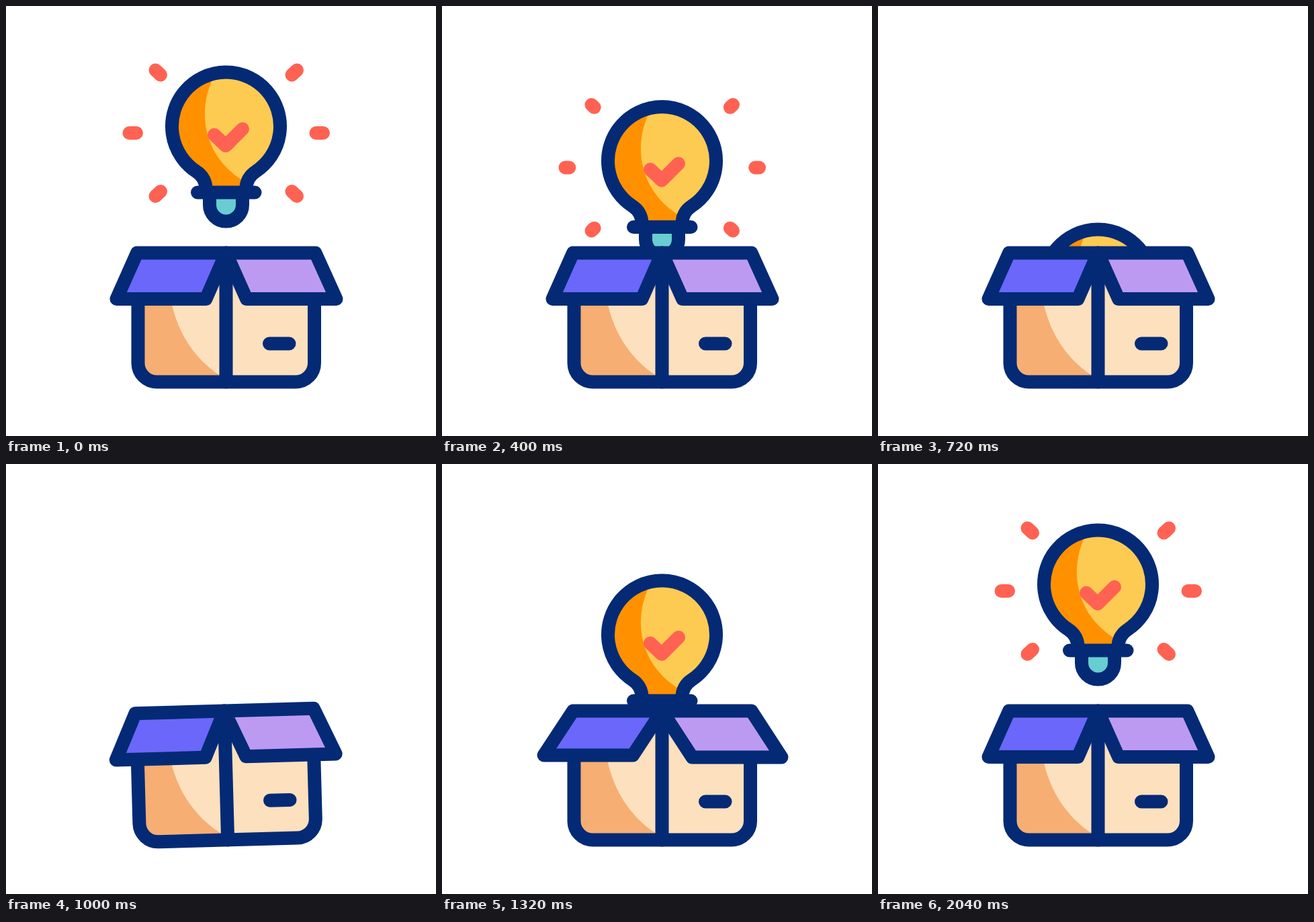
These frames come from a looping animation (640x640 px, 2160 ms). An HTML page:

```html
<!DOCTYPE html>
<html lang="en">
<head>
<meta charset="utf-8">
<title>Idea box</title>
<style>
  html, body { margin: 0; width: 100%; height: 100%; overflow: hidden; background: #fff; }
  svg { display: block; width: 100vw; height: 100vh; }
  .ink { stroke: #042a75; }
  .red { stroke: #ff6252; }
  .line { fill: none; }
  g { stroke-width: 20; stroke-linecap: round; stroke-linejoin: round; }
</style>
</head>
<body>
<svg viewBox="0 0 640 640">
  <defs>
    <path id="glass" d="M297.5 272C297.5 261 292 252 283.5 246.5A80.5 80.5 0 1 1 371.5 246.5C363 252 357.5 261 357.5 272"/>
    <path id="crate" d="M196.5 420V531.5A28 28 0 0 0 224.5 559.5H431A28 28 0 0 0 459 531.5V420"/>
    <clipPath id="glassClip"><use href="#glass"/></clipPath>
    <clipPath id="crateClip"><use href="#crate"/></clipPath>
    <clipPath id="aboveFloor"><rect width="640" height="500"/></clipPath>
  </defs>

  <g clip-path="url(#aboveFloor)">
    <g id="bulb">
      <g id="rays" class="red"></g>
      <path class="ink" fill="#68cdd1" d="M303 278V296A24.5 24.5 0 0 0 352 296V278"/>
      <use href="#glass" fill="#fecb52"/>
      <path clip-path="url(#glassClip)" fill="#ff9100" d="M312 100C284 150 289 222 356 262V280H230V90H312Z"/>
      <use href="#glass" class="ink line"/>
      <path class="ink" d="M285 277.5H370.5"/>
      <path id="tick" class="red line"/>
    </g>
  </g>

  <g id="box">
    <rect x="196.5" y="367.5" width="262.5" height="60" fill="#fde0bd"/>
    <use href="#crate" fill="#fde0bd"/>
    <path clip-path="url(#crateClip)" fill="#f6ae73" d="M190 400H240L246 440C256 490 285 530 322 552V570H190Z"/>
    <use href="#crate" class="ink line"/>
    <path class="ink" d="M327.5 367.5V559.5M392 502.5H421.5"/>
    <path id="flapL" class="ink" fill="#6a67fa"/>
    <path id="flapR" class="ink" fill="#bc9af2"/>
  </g>
</svg>

<script>
const LOOP = 2160, STEP = 40, SINK = 300;
const $ = id => document.getElementById(id);
const mix = (a, b, k) => a + (b - a) * k;
const span = (t, a, b) => Math.min(1, Math.max(0, (t - a) / (b - a)));
const smooth = x => x * x * (3 - 2 * x);

// Eased value from a list of [time, value] stops
function track(t, stops) {
  let value = stops[0][1];
  for (let i = 1; i < stops.length; i++) {
    const [a, from] = stops[i - 1], [b, to] = stops[i];
    if (t >= a) value = mix(from, to, smooth(span(t, a, b)));
  }
  return value;
}

const TILT = [[740, 0], [820, -3.2], [900, 3.2], [1000, -1.58], [1080, 0]];
const FLAP = [[1040, 0], [1240, 1.08], [1700, 0]];
const TICK = [[1380, 1], [1620, 1.48], [1860, 1]];

// Each ray: outer x, outer y, inner x, inner y
const rays = [
  [222.5, 95.5, 230, 102.5], [433, 95.5, 425.5, 102.5],
  [183.5, 189, 194, 189], [472, 189, 461.5, 189],
  [222.5, 283, 230, 276], [433, 283, 425.5, 276]
].map(ends => {
  const el = document.createElementNS("http://www.w3.org/2000/svg", "path");
  $("rays").append(el);
  return { el, ends };
});

function drawRays(t) {
  // Shrink towards the outer end, later grow from the inner end
  const tail = t < 1000 ? smooth(span(t, 190, 640)) : 0;
  const head = t < 1000 ? 1 : smooth(span(t, 1380, 1850));
  for (const { el, ends: [ox, oy, ix, iy] } of rays) {
    const at = k => `${mix(ix, ox, k)} ${mix(iy, oy, k)}`;
    el.setAttribute("d", head - tail > 0.001 ? `M${at(tail)}L${at(head)}` : "");
  }
}

function drawTick(t) {
  const s = track(t, TICK);
  const points = [[-21, -3.7], [-4, 12.5], [21, -12.5]];
  $("tick").setAttribute("d", "M" + points.map(([x, y]) => `${331 + x * s} ${195.5 + y * s}`).join("L"));
}

function drawBox(t) {
  const k = track(t, FLAP);
  const yl = 436 - 2.5 * k, yr = 436 + 0.5 * k;
  $("flapL").setAttribute("d", `M195 367.5H327.5L${297.5 - 13.5 * k} ${yl}H${164.5 - 13 * k}Z`);
  $("flapR").setAttribute("d", `M460.5 367.5H327.5L${358 + 14.5 * k} ${yr}H${491.5 + 14 * k}Z`);
  $("box").setAttribute("transform", `rotate(${track(t, TILT)} 327.5 464)`);
}

function draw(t) {
  const drop = t < 1000
    ? SINK * span(t, 40, 795) ** 2.38
    : SINK * (1 - span(t, 1103, 1720)) ** 3.2;
  $("bulb").setAttribute("transform", `translate(0 ${drop})`);
  drawRays(t);
  drawTick(t);
  drawBox(t);
}

const start = performance.now();
function tick() {
  const t = (performance.now() - start) % LOOP;
  draw(Math.floor(t / STEP) * STEP);
  requestAnimationFrame(tick);
}
tick();
</script>
</body>
</html>
```
